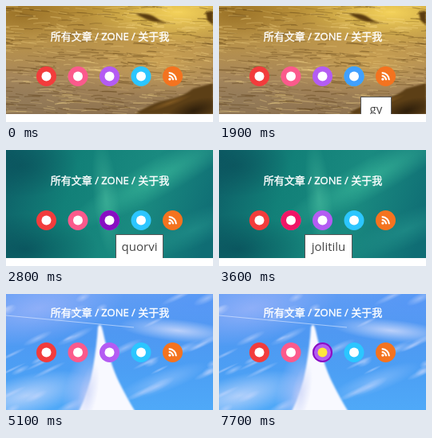
Write an HTML page with a canvas that moves like this. It is 259 by 146 pixels and loops after 8000 ms.

```html
<!DOCTYPE html>
<html lang="zh">
<head>
<meta charset="utf-8">
<style>
html, body { margin: 0; width: 100%; height: 100%; overflow: hidden; background: #fff; }
canvas { display: block; }
</style>
</head>
<body>
<canvas id="stage" width="259" height="146"></canvas>
<script>
const W = 259, H = 146, LOOP = 8000, HERO = 136, SCENE2 = 5100;
const ctx = document.getElementById('stage').getContext('2d');
const clamp = v => Math.max(0, Math.min(1, v));

// base colour and hover colour, left to right
const ICONS = [
  ['#f23c3c', '#c91414'],
  ['#fb5a8c', '#ef1566'],
  ['#b45cf3', '#880fc2'],
  ['#2cc6ff', '#40a0ff'],
  ['#f4731f', '#dc540c']
];
const FEED = 4;

// icon, hover start, hover end, fade length
const HOVERS = [
  [4, 700, 1300, 100], [3, 1400, 2200, 200], [2, 2400, 3000, 200],
  [1, 3200, 3800, 200], [0, 3900, 4500, 200],
  [4, 5900, 6500, 300], [3, 6600, 7400, 300], [2, 7500, 8100, 300]
];

// label, start, end, x, y, width
const TIPS = [
  ['rss', 1100, 1300, 218, 105, 39], ['gy', 1900, 2200, 177, 114, 39],
  ['quorvi', 2800, 3000, 137, 106, 60], ['jolitilu', 3600, 3800, 107, 106, 60],
  ['vanu', 4300, 4500, 65, 106, 52],
  ['rss', 6300, 6500, 226, 93, 39], ['gy', 7100, 7400, 180, 94, 39]
];

function seeded(seed) {
  return () => (seed = (seed * 16807) % 2147483647) / 2147483647;
}

function layer(paint) {
  const c = document.createElement('canvas');
  c.width = W;
  c.height = H;
  paint(c.getContext('2d'));
  return c;
}

function fillGradient(g, x, y, ...colors) {
  const grad = g.createLinearGradient(0, 0, x, y);
  colors.forEach((c, i) => grad.addColorStop(i / (colors.length - 1), c));
  g.fillStyle = grad;
  g.fillRect(0, 0, W, H);
}

function glow(g, x, y, rx, ry, rgb, alpha, angle = 0) {
  const grad = g.createRadialGradient(0, 0, 0, 0, 0, 1);
  grad.addColorStop(0, `rgba(${rgb},${alpha})`);
  grad.addColorStop(1, `rgba(${rgb},0)`);
  g.save();
  g.translate(x, y);
  g.rotate(angle);
  g.scale(rx, ry);
  g.fillStyle = grad;
  g.fillRect(-1, -1, 2, 2);
  g.restore();
}

function blob(g, color, blur, path) {
  g.save();
  g.filter = `blur(${blur}px)`;
  g.fillStyle = color;
  g.fill(new Path2D(path));
  g.restore();
}

// short, nearly level strokes in two tones
function ripples(g, count, dark, light) {
  const rnd = seeded(41);
  for (let i = 0; i < count; i++) {
    const x = rnd() * (W + 20) - 20, y = rnd() * HERO, len = 6 + rnd() * 20, rise = rnd() * 4 - 1;
    g.strokeStyle = rnd() < 0.5 ? dark : light;
    g.lineWidth = 0.5 + rnd();
    g.beginPath();
    g.moveTo(x, y);
    g.quadraticCurveTo(x + len / 2, y - 1 + rise, x + len, y + rise);
    g.stroke();
  }
}

const water = layer(g => {
  fillGradient(g, 0, HERO, '#b58c34', '#b8924a', '#a8875a', '#8d7250');
  glow(g, 215, 8, 120, 42, '255,222,96', 0.85);
  glow(g, 190, 70, 110, 45, '226,180,84', 0.5);
  glow(g, 20, 10, 70, 30, '128,88,24', 0.5);
  glow(g, 20, 115, 90, 40, '140,122,96', 0.4);
  ripples(g, 620, 'rgba(84,56,16,.34)', 'rgba(255,226,146,.3)');
  blob(g, '#5a3c10', 0.8, 'M162 10 Q178 8 188 15 T204 20 Q188 22 176 17Z M250 8 L259 6 V24 L252 18Z');
  blob(g, '#5c3f16', 1, 'M162 136 Q182 122 202 118 T234 104 L259 97 V136Z');
  glow(g, 235, 132, 36, 14, '34,22,8', 0.8, -0.3);
  glow(g, 205, 122, 30, 4, '150,104,40', 0.6, -0.35);
});

// passing view between the water and the aurora
const dusk = layer(g => {
  fillGradient(g, 0, HERO, '#5d9c76', '#66a27c', '#5f9378', '#83917c');
  glow(g, 20, 70, 80, 60, '120,150,116', 0.6);
  ripples(g, 150, 'rgba(44,88,68,.22)', 'rgba(160,205,160,.22)');
  blob(g, '#24563f', 1, 'M152 12 Q178 8 200 13 T256 12 V24 Q235 30 208 25 T152 12Z');
  glow(g, 128, 70, 12, 60, '190,235,200', 0.45, -0.1);
  glow(g, 155, 117, 28, 22, '255,225,205', 0.9);
});

const aurora = layer(g => {
  fillGradient(g, W, 90, '#0d5d66', '#128078', '#1a8a80', '#0f6d74');
  glow(g, 190, 35, 130, 24, '62,190,158', 0.6, -0.5);
  glow(g, 125, 60, 16, 75, '90,205,170', 0.4, -0.1);
  glow(g, 235, 100, 80, 22, '40,155,145', 0.5, -0.4);
  glow(g, 25, 125, 90, 45, '6,66,82', 0.6);
  glow(g, 20, 20, 70, 40, '8,72,84', 0.5);
});

const sky = layer(g => {
  const rnd = seeded(77);
  fillGradient(g, 0, H, '#5f9cf4', '#4f98f2', '#4c9ff4', '#4fa9f8');
  glow(g, 40, 18, 110, 44, '160,182,250', 0.75, -0.2);
  glow(g, 240, 12, 80, 30, '84,150,246', 0.7);
  glow(g, 215, 46, 75, 14, '214,222,252', 0.8, 0.1);
  glow(g, 25, 128, 80, 26, '200,218,252', 0.8, -0.25);
  glow(g, 195, 110, 60, 14, '150,196,252', 0.6, -0.35);
  for (let i = 0; i < 34; i++) {
    glow(g, rnd() * W, rnd() * H, 8 + rnd() * 22, 2 + rnd() * 4, '205,218,253', 0.5, -0.45);
  }
  g.strokeStyle = 'rgba(225,235,255,.6)';
  g.stroke(new Path2D('M0 27 L160 42'));
  glow(g, 98, 125, 26, 60, '190,200,250', 0.7, 0.2);
  blob(g, '#f8f9ff', 1, 'M115 42 Q118 34 121 46 Q130 88 142 112 T163 150 H90 Q104 122 109 92 T115 42Z');
  glow(g, 103, 125, 12, 40, '195,205,246', 0.6, 0.2);
});

function disc(x, y, r, color) {
  ctx.fillStyle = color;
  ctx.beginPath();
  ctx.arc(x, y, r, 0, Math.PI * 2);
  ctx.fill();
}

function feedGlyph(x, y, color) {
  const cx = x - 4.8, cy = y + 4.8;
  disc(cx + 1.2, cy - 1.2, 1.7, color);
  ctx.strokeStyle = color;
  ctx.lineWidth = 2.1;
  for (const r of [5.4, 9.2]) {
    ctx.beginPath();
    ctx.arc(cx, cy, r, -Math.PI / 2, 0);
    ctx.stroke();
  }
}

function hoverLevel(icon, t) {
  let level = 0;
  for (const [id, on, off, fade] of HOVERS) {
    if (id !== icon) continue;
    const ramp = start => clamp((t - start + 100) / fade);
    level = Math.max(level, ramp(on) - ramp(off));
  }
  return level;
}

function drawIcon(i, y, t, ringStyle) {
  const x = 50.5 + i * 39.5, [base, active] = ICONS[i], level = hoverLevel(i, t);
  disc(x, y, 12.5, base);
  ctx.globalAlpha = level;
  disc(x, y, 12.5, active);
  ctx.globalAlpha = 1;
  if (ringStyle && level) disc(x, y, 10.5, base);
  const glyph = ringStyle ? `rgb(255,${255 - 25 * level},${255 - 195 * level})` : '#fff';
  if (i === FEED) feedGlyph(x, y, glyph);
  else disc(x, y, 6, glyph);
}

function drawTip([label, , , x, y, w]) {
  ctx.fillStyle = '#fff';
  ctx.fillRect(x, y, w, 32);
  ctx.strokeStyle = '#555';
  ctx.lineWidth = 1;
  ctx.strokeRect(x + 0.5, y + 0.5, w - 1, 31);
  ctx.font = '15px "Open Sans", sans-serif';
  ctx.fillStyle = '#444';
  ctx.fillText(label, x + w / 2, y + 21);
}

function drawLayer(image, alpha) {
  ctx.globalAlpha = alpha;
  ctx.drawImage(image, 0, 0);
  ctx.globalAlpha = 1;
}

function drawMenu(y) {
  const menu = '所有文章 / ZONE / 关于我';
  ctx.font = '13px "Open Sans", "Noto Sans CJK SC", "Noto Sans CJK", sans-serif';
  ctx.fillStyle = ctx.strokeStyle = '#fff';
  ctx.lineWidth = 0.4;
  ctx.fillText(menu, 130, y);
  ctx.strokeText(menu, 130, y);
}

function draw() {
  const t = Math.floor(performance.now() % LOOP / 100) * 100;
  const second = t >= SCENE2, lift = second ? 15 : 0;
  ctx.textAlign = 'center';

  if (second) {
    drawLayer(sky, 1);
  } else {
    drawLayer(water, 1);
    drawLayer(aurora, clamp((t - 2100) / 700));
    drawLayer(dusk, clamp(1 - Math.abs(t - 2500) / 300));
  }

  drawMenu(43 - lift);
  ICONS.forEach((_, i) => drawIcon(i, 88.5 - lift, t, second));
  TIPS.filter(([, on, off]) => t >= on && t < off).forEach(drawTip);

  if (!second) {
    ctx.fillStyle = '#fff';
    ctx.fillRect(0, HERO, W, H - HERO);
  }
  requestAnimationFrame(draw);
}
draw();
</script>
</body>
</html>
```
